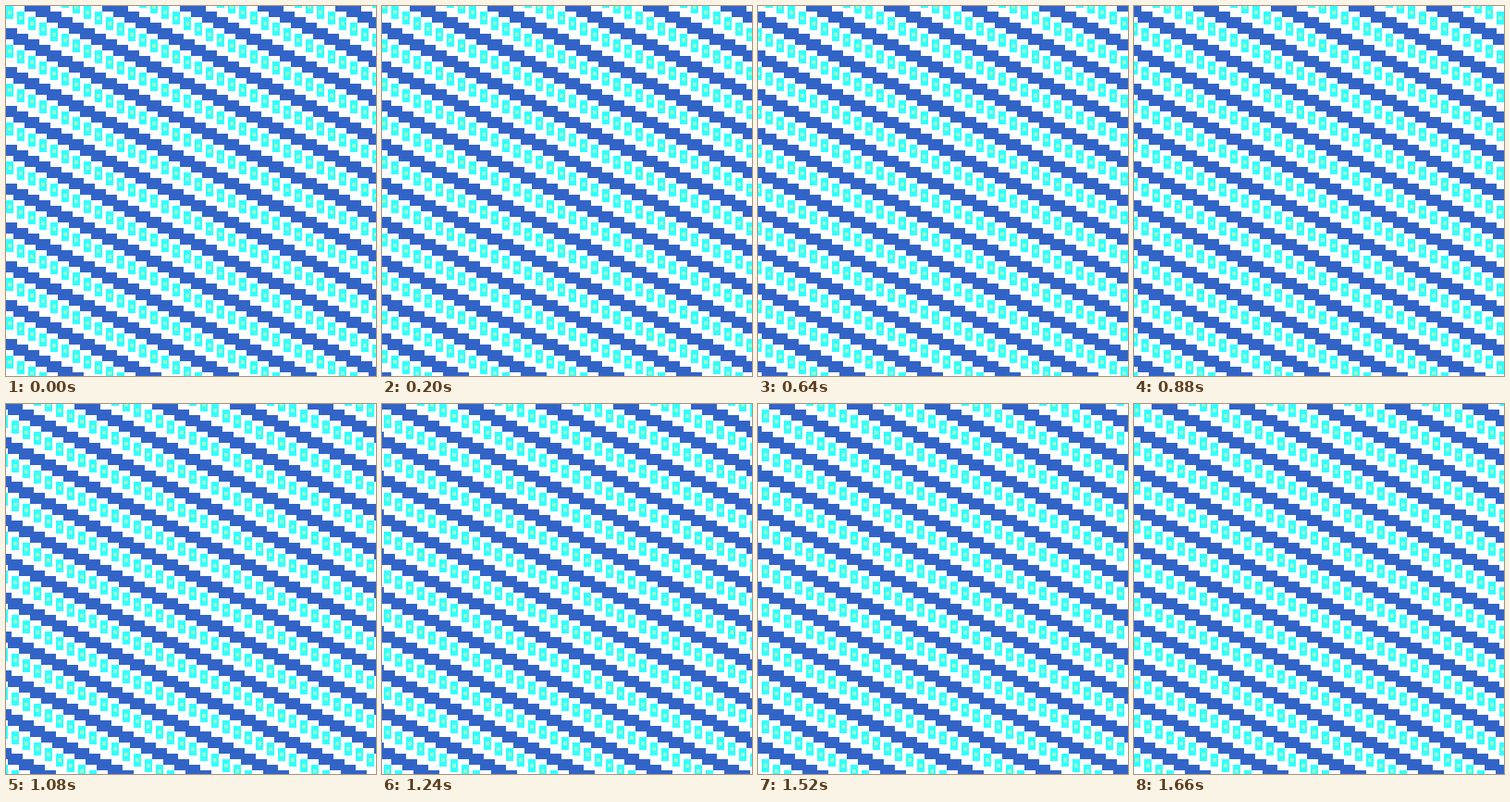
An HTML page without scripts for the animation above (1680 ms loop, 400 by 400 pixels).

```html
<!DOCTYPE html>
<html lang="en">
<head>
<meta charset="utf-8">
<title>Sliding lattice</title>
<style>
  html, body { margin: 0; width: 100%; height: 100%; overflow: hidden; background: #fff; }
  svg { display: block; width: 400px; height: 400px; }
  .slide { animation: slide 1680ms steps(84) infinite; }
  @keyframes slide { to { transform: translateX(84px); } }
</style>
</head>
<body>
<svg viewBox="0 0 400 400" shape-rendering="crispEdges">
  <defs>
    <!-- one cell: a dotted tile and the band step below it -->
    <g id="cell">
      <rect width="8" height="14" fill="#3ff"/>
      <rect x="2" y="5" width="4" height="4" fill="#9fc"/>
      <rect x="-4" y="24" width="16" height="12" fill="#3264c8"/>
    </g>
    <!-- cells stepping down to the right, one extra at each end for the seams -->
    <g id="stair">
      <use href="#cell" x="-12" y="-6"/>
      <use href="#cell"/>
      <use href="#cell" x="12" y="6"/>
      <use href="#cell" x="24" y="12"/>
      <use href="#cell" x="36" y="18"/>
      <use href="#cell" x="48" y="24"/>
      <use href="#cell" x="60" y="30"/>
      <use href="#cell" x="72" y="36"/>
      <use href="#cell" x="84" y="42"/>
    </g>
    <pattern id="weave" width="84" height="42" patternUnits="userSpaceOnUse">
      <use href="#stair" y="-84"/>
      <use href="#stair" y="-42"/>
      <use href="#stair"/>
      <use href="#stair" y="42"/>
    </pattern>
  </defs>
  <g class="slide">
    <rect x="-84" width="484" height="400" fill="url(#weave)"/>
  </g>
</svg>
</body>
</html>
```
